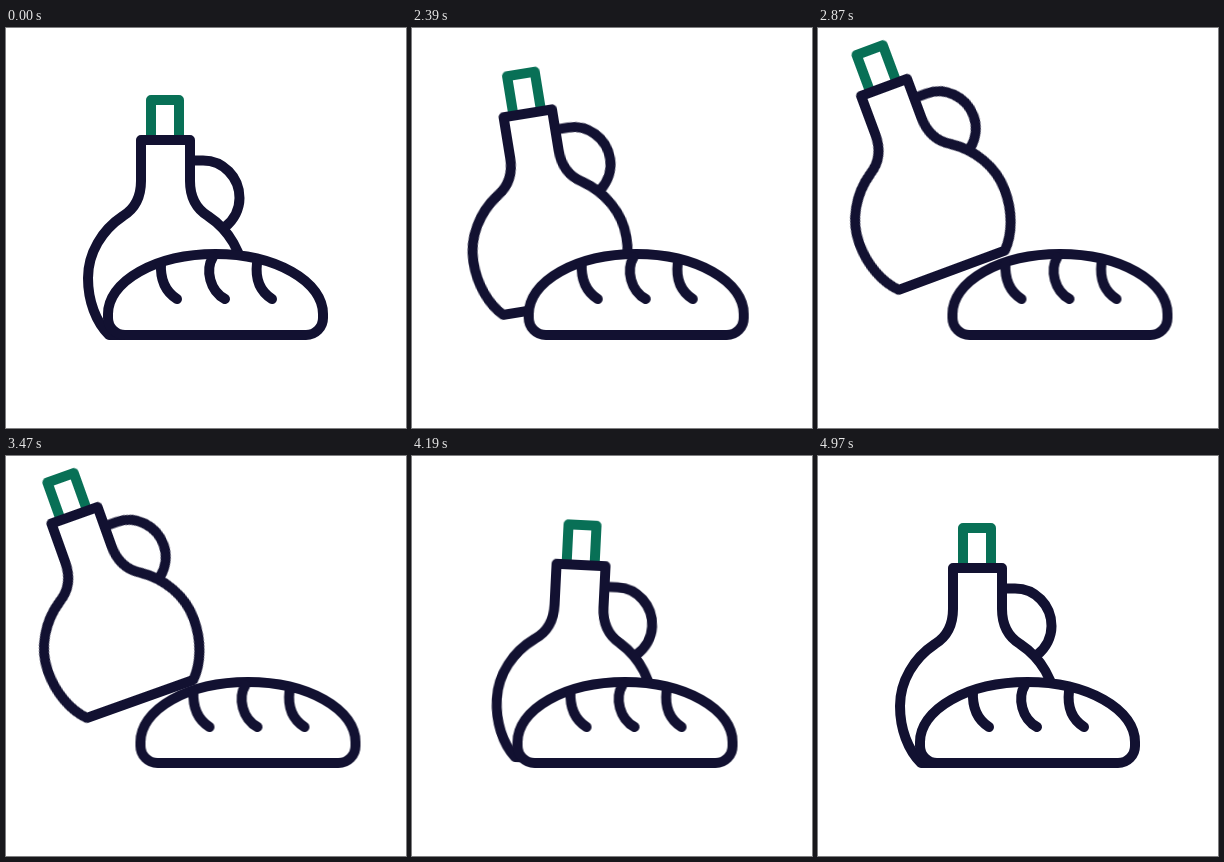
Write an HTML page that moves like this. It is 400x400 px and loops after 5.03 s.

```html
<!DOCTYPE html>
<html lang="en">
<head>
<meta charset="utf-8">
<title>Oil and bread</title>
<style>
  html, body { margin: 0; width: 100%; height: 100%; overflow: hidden; background: #fff; }
  svg { display: block; width: 100vw; height: 100vh; }
  path { fill: none; stroke: #121131; stroke-width: 10; stroke-linecap: round; stroke-linejoin: round; }
  #cap { stroke: #087056; stroke-linecap: butt; }
  #loaf { fill: #fff; }
  #tilt { transform-origin: 215px 307px; }
</style>
</head>
<body>
<svg viewBox="0 0 400 400">
  <g id="lift">
    <g id="tilt">
      <path id="cap" d="M145 110V72H173V110"/>
      <path d="M184 132.5H197C217 132.5 233.5 149 233.5 170C233.5 181 228 192 219 199"/>
      <path d="M135 112V153C135 167 130 180 117 188C96 202 82 225 82 250C82 273 90 294 103 307H216C229 294 237 273 237 250C237 225 223 202 202 188C189 180 184 167 184 153V112Z"/>
    </g>
  </g>
  <g id="bread">
    <path id="loaf" d="M119 307H300A17 17 0 0 0 317 290V286A107.5 60 0 0 0 102 286V290A17 17 0 0 0 119 307Z"/>
    <path d="M155 235C154 252 160 264 171 271"/>
    <path d="M207 229C199 242 204 263 219 271"/>
    <path d="M251 235C249 252 255 264 266 271"/>
  </g>
</svg>
<script>
  const LOOP = 5030;
  const START = 2015, PEAK = 3122;
  const rise = 'cubic-bezier(.33,0,.33,1)';
  const lower = 'cubic-bezier(.85,0,.5,1)';
  const swing = 'cubic-bezier(.69,0,.58,1)';
  const slide = 'cubic-bezier(.83,0,.62,1)';
  const drop = 'cubic-bezier(.7,0,1,.8)';

  // Each step: time in ms, transform, easing towards the next step
  function play(id, rest, steps) {
    const all = [[0, rest], [START, rest, rise], ...steps, [LOOP, rest]];
    const frames = all.map(([time, transform, easing = 'linear']) =>
      ({ offset: time / LOOP, transform, easing }));
    document.getElementById(id).animate(frames, { duration: LOOP, iterations: Infinity });
  }

  play('lift', 'translate(0px, 0px)', [
    [PEAK, 'translate(-30.5px, -88px)', lower],
    [4260, 'translate(0px, 0px)']
  ]);
  play('tilt', 'rotate(0deg)', [
    [PEAK, 'rotate(-21.3deg)', swing],
    [4450, 'rotate(5.5deg)', drop],
    [4965, 'rotate(0deg)']
  ]);
  play('bread', 'translate(0px, 0px)', [
    [PEAK, 'translate(34px, 0px)', slide],
    [4410, 'translate(0px, 0px)']
  ]);
</script>
</body>
</html>
```
